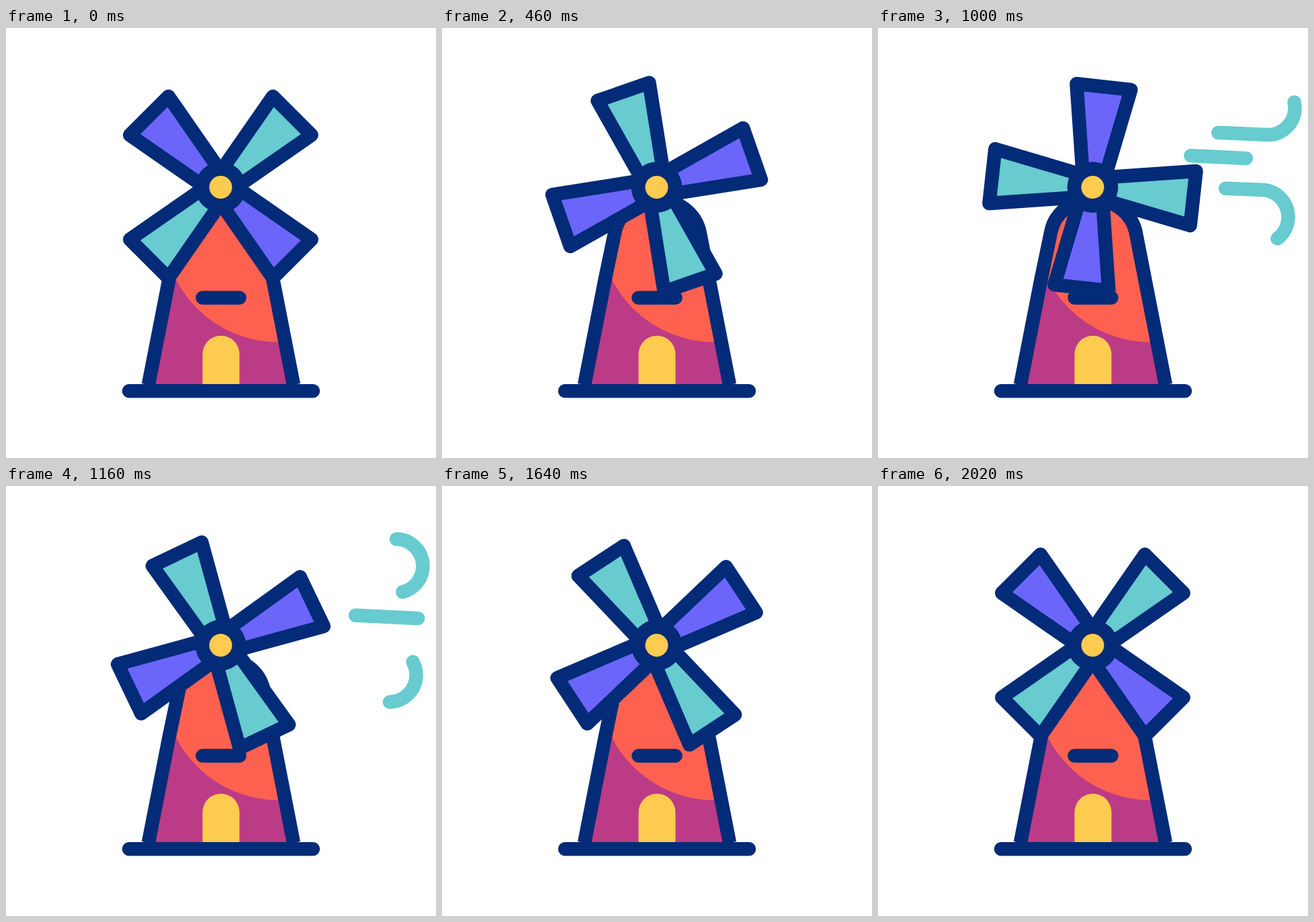
Animation, 640 px wide and 640 px high, one loop 2.4 s. Source, as an HTML page:

```html
<!DOCTYPE html>
<html lang="en">
<head>
<meta charset="utf-8">
<title>Windmill</title>
<style>
  html, body { margin: 0; width: 100%; height: 100%; overflow: hidden; background: #fff; }
  svg { display: block; width: 100vw; height: 100vh; }
  .line { fill: none; stroke-width: 20.5; stroke-linecap: round; stroke-linejoin: round; }
  .navy { stroke: #032b77; }
  .teal { stroke: #67cbd0; }
</style>
</head>
<body>
<svg viewBox="0 0 640 640">
  <defs>
    <path id="tower" d="M212 531 L242.5 375 L257.5 303 C263 276 287 256 320 256 S377 276 383.5 303 L397.5 375 L428 531"/>
    <clipPath id="inside"><use href="#tower"/></clipPath>
    <path id="blade" d="M-13.6 0 L-40.7 -150.5 H40.7 L13.6 0 Z"/>
  </defs>

  <g class="line teal">
    <path class="wind" d="M496 238 L573 241 A40.3 40.3 0 0 1 571 321.5"/>
    <path class="wind" d="M500 155.5 L580 159 A39.8 39.8 0 0 0 581 79"/>
    <path class="wind" d="M464 190 L615 197"/>
  </g>

  <g clip-path="url(#inside)">
    <rect x="200" y="240" width="240" height="300" fill="#bc3b86"/>
    <circle cx="405" cy="297" r="170.5" fill="#ff6150"/>
  </g>
  <path d="M292.5 531 V485.5 A27.5 27.5 0 0 1 347.5 485.5 V531 Z" fill="#fdcb50"/>
  <g class="line navy">
    <use href="#tower" style="stroke-linecap:butt"/>
    <path d="M183 540.3 H457 M292.5 401.5 H347.5"/>
  </g>

  <g id="sails">
    <g class="line navy" id="blades"></g>
    <circle r="37.8" fill="#032b77"/>
    <circle r="17" fill="#fdcb50"/>
  </g>
</svg>
<script>
const LOOP = 2400;
const sails = document.getElementById("sails");

document.getElementById("blades").innerHTML = [45, 135, 225, 315].map((angle, i) =>
  `<use href="#blade" transform="rotate(${angle})" style="fill:${i % 2 ? "#6b65f9" : "#67cbd0"}"/>`
).join("");

// Start times of the leading and trailing end of each gust
const gusts = [[690, 910], [735, 954], [786, 975]];
const winds = [...document.querySelectorAll(".wind")].map((path, i) => ({
  path, length: path.getTotalLength(), head: gusts[i][0], tail: gusts[i][1]
}));

const progress = (t, start, duration) => Math.min(1, Math.max(0, (t - start) / duration));
const smooth = s => s * s * (3 - 2 * s);

// Cubic bezier easing with handles (x1, 0) and (x2, 1)
function ease(p, x1, x2) {
  let low = 0, high = 1;
  for (let i = 0; i < 30; i++) {
    const s = (low + high) / 2, r = 1 - s;
    if (3 * r * r * s * x1 + 3 * r * s * s * x2 + s ** 3 < p) low = s;
    else high = s;
  }
  return smooth((low + high) / 2);
}

// The sails wind back first, then make a full turn
function sailAngle(t) {
  const back = 66.6, turn = 520, end = 2020;
  if (t >= end) return 0;
  if (t < turn) return -back * smooth(t / turn);
  return -back + (360 + back) * ease(progress(t, turn, end - turn), 0.23, 0.754);
}

function draw(t) {
  sails.setAttribute("transform", `translate(319.5 237) rotate(${sailAngle(t)})`);
  for (const { path, length, head, tail } of winds) {
    const to = length * smooth(progress(t, head, 400));
    const from = length * smooth(progress(t, tail, 450));
    path.style.visibility = to > from ? "visible" : "hidden";
    path.style.strokeDasharray = `${Math.max(0, to - from)} 1000`;
    path.style.strokeDashoffset = -from;
  }
}

const begin = performance.now();
function tick() {
  draw((performance.now() - begin) % LOOP);
  requestAnimationFrame(tick);
}
draw(0);
requestAnimationFrame(tick);
</script>
</body>
</html>
```
